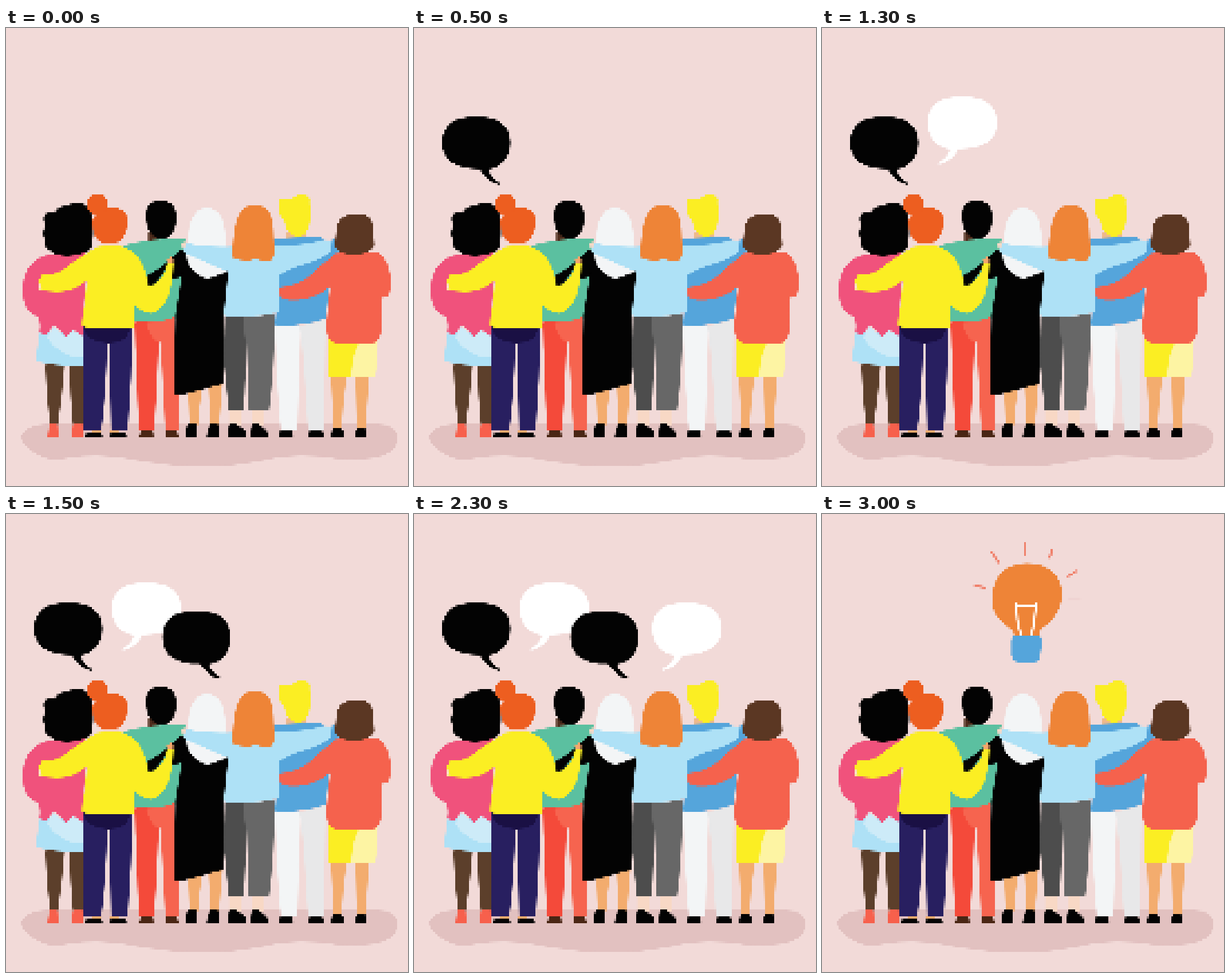
Animation of 702 by 798 pixels, one loop 3500 ms. Source, as an HTML page with a canvas:

```html
<!DOCTYPE html>
<html lang="en">
<head>
<meta charset="utf-8">
<title>Shared idea</title>
<style>
  html, body { margin: 0; width: 100%; height: 100%; overflow: hidden; background: #f2dad8; }
  canvas { display: block; }
</style>
</head>
<body>
<canvas width="702" height="798"></canvas>
<script>
const screen2d = document.querySelector('canvas').getContext('2d');
const STEP = 500, STEPS = 7;

// Coarse pixel grid: cell size and offset on the stage
const COLS = 182, ROWS = 206, CELL_X = 3.893, CELL_Y = 3.88, LEFT = -1.7, TOP = -1.2;
const EDGE_CONTRAST = 2.5;

const BACKGROUND = '#f2dad8', BLACK = '#030303', WHITE = '#fff', YELLOW = '#fbee23', ORANGE = '#ee8437',
  BLUE = '#55a5db', SKY = '#aee1f6', CORAL = '#f5624d', SKIN = '#f3ac6e', SNOW = '#f3f5f6',
  BROWN = '#5c3f2b', NAVY = '#281f60';

// Back to front: [colour, path]
const crowd = [
  ['#e2c1c0', 'M70 690H650Q685 692 685 716Q683 738 650 748Q600 756 555 747Q490 740 440 755Q350 773 240 755Q170 738 110 749Q85 755 65 748Q28 732 26 712Q32 692 70 690Z'],
  // pink top, light skirt
  [BROWN, 'M69 586H102L97 640L90 692H77L72 640ZM111 586H134V692H117L113 640Z'],
  ['#f7604c', 'M76 690H90L91 713H73ZM117 690H134V713H115Z'],
  [SKY, 'M58 531H134V589Q90 590 52 581Z'],
  ['#cdebf8', 'M72 540L83 519L103 538L117 526L134 537V574Q95 575 72 540Z'],
  ['#f0527c', 'M80 394Q40 398 31 440Q25 482 45 498L57 504Q61 520 58 531L70 534L84 518L104 538L118 526L136 538V480L145 400L134 388Z'],
  [BLACK, 'M118 305Q150 302 152 340Q153 380 146 388Q125 397 108 397Q85 397 80 390Q64 380 68 368Q62 355 70 345Q62 332 70 323Q78 318 86 320Q90 308 104 310Z'],
  // green top, red trousers
  ['#4f2d1d', 'M249 355H266V372H249Z'],
  ['#5bc0a0', 'M203 381Q230 367 315 367L312 385Q300 390 305 440L302 504Q260 516 225 512L222 400Z'],
  [BLACK, 'M271 301C289 301 298 310 298 333C296 356 285 368 268 368C252 362 244 348 244 325C245 308 254 301 271 301Z'],
  ['#f44a3a', 'M225 512L268 510Q265 600 259 702H232L228 600Z'],
  ['#f6644f', 'M245 513Q285 510 295 503V640H302V702H278L270 547H264Q250 538 245 513Z'],
  ['#4a2614', 'M236 702H257L258 713H232ZM278 702H298L302 713H278Z'],
  // black dress, white scarf
  [BLACK, 'M245 450V432Q275 418 302 388L318 388V425L306 430Q298 440 291 438L280 418Q268 440 253 452Z'],
  [SKIN, 'M318 634L342 630Q337 660 336 692H321ZM354 626L378 618Q374 670 372 692H358Z'],
  [BLACK, 'M312 390L388 425L384 480L380 500V620Q340 632 303 640H295V560L296 500Q303 460 308 425ZM317 690H333V713H314V700ZM357 690H371V713H350Q352 698 357 690Z'],
  [SNOW, 'M350 313C372 313 381 332 383 360L384 382H318C316 350 325 313 350 313ZM313 388Q315 427 350 437Q375 432 385 424V410Q345 405 318 386Z'],
  // yellow top, navy trousers
  ['#ed5e20', 'M178 307A18 18 0 1 0 157 325L151 335Q149 376 180 376Q211 376 213 335Q212 312 180 313L170 320Q178 316 178 307Z'],
  ['#f6d3c4', 'M168 374H196V384H168Z'],
  [NAVY, 'M134 516H221Q220 610 213 701H184L180 546H177Q176 630 166 701H135Z'],
  ['#1a1044', 'M134 516H219Q215 543 195 547Q180 551 160 546Q137 540 134 516Z'],
  [SKIN, 'M150 701H167V706H150ZM182 701H198V706H182Z'],
  [BLACK, 'M139 713V707L152 704H164L169 713ZM181 713V707L196 704H206L212 713Z'],
  [YELLOW, 'M160 381Q125 401 97 423Q80 432 62 430Q54 440 56 455Q65 460 100 459Q125 455 142 438L138 480Q132 505 132 518Q135 523 165 523H224V482Q240 497 252 497Q270 496 285 465Q293 440 293 408H282Q277 440 250 451Q246 425 236 408Q224 385 200 380Q180 377 160 381Z'],
  ['#fbe0cd', 'M56 438L63 457L58 456Z'],
  ['#f5a86c', 'M280 403L290 398L294 408L282 410Z'],
  // blue top, white trousers
  ['#eeb98b', 'M490 355H524V368H490Z'],
  [BLUE, 'M467 367L548 363L556 372L580 370V395Q566 400 566 440L558 506Q520 520 470 518L477 430Z'],
  [YELLOW, 'M478 298Q490 295 500 297Q512 287 520 291Q533 292 530 305Q534 325 530 340Q526 360 514 363Q498 365 490 352Q488 335 478 325Q476 310 478 298Z'],
  [SNOW, 'M470 519L515 518L509 702H480Q473 620 470 519Z'],
  ['#e8e8e9', 'M512 519Q540 515 558 507L556 620V702H527L521 600L516 537Z'],
  [BLACK, 'M478 702H501L502 713H477ZM529 702H553L555 713H528Z'],
  // light top, grey trousers
  ['#f8d8c5', 'M390 666H411V694H390ZM430 666H451V694H432Z'],
  ['#4d4d4d', 'M382 502H422L419 580L415 667H389Q384 620 380 580Z'],
  ['#676767', 'M415 504Q440 503 470 497Q469 600 459 667H424L420 550Q415 540 415 504Z'],
  [BLACK, 'M390 690H403Q415 699 419 704V713H388Q387 700 390 690ZM430 690H442Q454 700 458 706V713H427Q427 700 430 690Z'],
  [SKY, 'M308 375Q312 372 330 378Q365 382 398 380H470Q520 378 553 370Q568 368 575 378Q565 398 530 409Q495 418 478 430L477 495Q440 505 382 502L380 498L388 425Q345 408 312 392Q306 385 308 375Z'],
  ['#f8d8c5', 'M306 374L316 372L309 388Z'],
  [BLUE, 'M569 367L581 371V390L558 403L567 388Z'],
  [ORANGE, 'M433 308C457 308 466 325 467 350L469 395L462 407Q445 407 430 400L428 406Q405 404 396 400C398 345 403 308 433 308Z'],
  // coral top, yellow shorts
  [SKIN, 'M567 606H595Q588 650 586 698H572ZM610 606H634Q630 660 628 698H613Z'],
  [BLACK, 'M571 698H586L591 705V713H568V705ZM613 698H628L630 705V713H610V705Z'],
  [YELLOW, 'M562 540H622L602 608H562Z'],
  ['#fdf4a3', 'M650 535Q650 580 645 608H602Q605 560 620 545Z'],
  [CORAL, 'M478 452Q500 450 520 440Q550 415 575 393Q600 388 650 391Q672 405 672 450L668 468L655 470L656 525Q655 550 636 550H580Q558 548 559 520L566 450Q545 470 510 474Q480 475 478 465Z'],
  ['#5b3723', 'M610 324C630 323 639 330 640 345L643 380Q635 394 608 395Q580 393 575 380Q577 350 580 340Q588 324 610 324Z'],
];

const bubble = new Path2D('M60 0C97 0 119 14 119 46C119 78 97 92 81 92Q83 105 102 116L101 119Q79 115 66 92C24 92 0 78 0 46C0 14 23 0 60 0Z');
// [colour, left, top, horizontal scale]; negative scale mirrors
const bubbles = [
  [BLACK, 49, 154, 1], [WHITE, 306, 119, -1.02], [BLACK, 273, 169, 1],
  [WHITE, 537, 154, -1.02], [BLACK, 671, 185, -1.05],
];

// Bulb parts: [colour, path, line width]; filled when there is no width
const bulb = [
  [ORANGE, 'M358 86C398 86 419 108 419 140C417 170 402 186 388 196Q379 202 378 213H336Q336 203 322 194C303 182 297 165 297 145C300 105 322 86 358 86Z'],
  [BLUE, 'M336 212H379Q385 214 384 222L380 253Q377 258 370 258H341Q333 257 331 245V220Q332 213 336 212Z'],
  [WHITE, 'M339 155L341 185L347 212M374 155L371 185L366 212M341 159H372', 4],
  ['#f0806b', 'M355 49V73M296 65L309 86M403 61L397 78M428 110L446 98M265 124L287 129', 4],
  ['#efd3d2', 'M430 148H452', 3],
];

function makeGrid() {
  const canvas = document.createElement('canvas');
  canvas.width = COLS;
  canvas.height = ROWS;
  return canvas.getContext('2d', { willReadFrequently: true });
}

const grid = makeGrid(), scratch = makeGrid();

// Draws one shape in stage coordinates and hardens its edges on the grid
function stamp(color, path, lineWidth = 0, x = 0, y = 0, scaleX = 1) {
  scratch.resetTransform();
  scratch.clearRect(0, 0, COLS, ROWS);
  scratch.setTransform(scaleX / CELL_X, 0, 0, 1 / CELL_Y, (x - LEFT) / CELL_X, (y - TOP) / CELL_Y);
  scratch.fillStyle = scratch.strokeStyle = color;
  scratch.lineWidth = lineWidth;
  if (lineWidth) scratch.stroke(path);
  else scratch.fill(path);
  const image = scratch.getImageData(0, 0, COLS, ROWS), data = image.data;
  for (let i = 3; i < data.length; i += 4) data[i] = (data[i] - 127.5) * EDGE_CONTRAST + 127.5;
  scratch.putImageData(image, 0, 0);
  grid.drawImage(scratch.canvas, 0, 0);
}

function drawStep(step) {
  grid.fillStyle = BACKGROUND;
  grid.fillRect(0, 0, COLS, ROWS);
  for (const [color, d] of crowd) stamp(color, new Path2D(d));
  if (step < STEPS - 1) {
    for (const [color, x, y, scaleX] of bubbles.slice(0, step)) stamp(color, bubble, 0, x, y, scaleX);
  } else {
    for (const [color, d, lineWidth] of bulb) stamp(color, new Path2D(d), lineWidth);
  }
  screen2d.imageSmoothingEnabled = false;
  screen2d.drawImage(grid.canvas, LEFT, TOP, COLS * CELL_X, ROWS * CELL_Y);
}

let shown = -1;
function render(time) {
  const step = Math.floor(time % (STEP * STEPS) / STEP);
  if (step !== shown) drawStep(shown = step);
  requestAnimationFrame(render);
}
render(performance.now());
</script>
</body>
</html>
```
